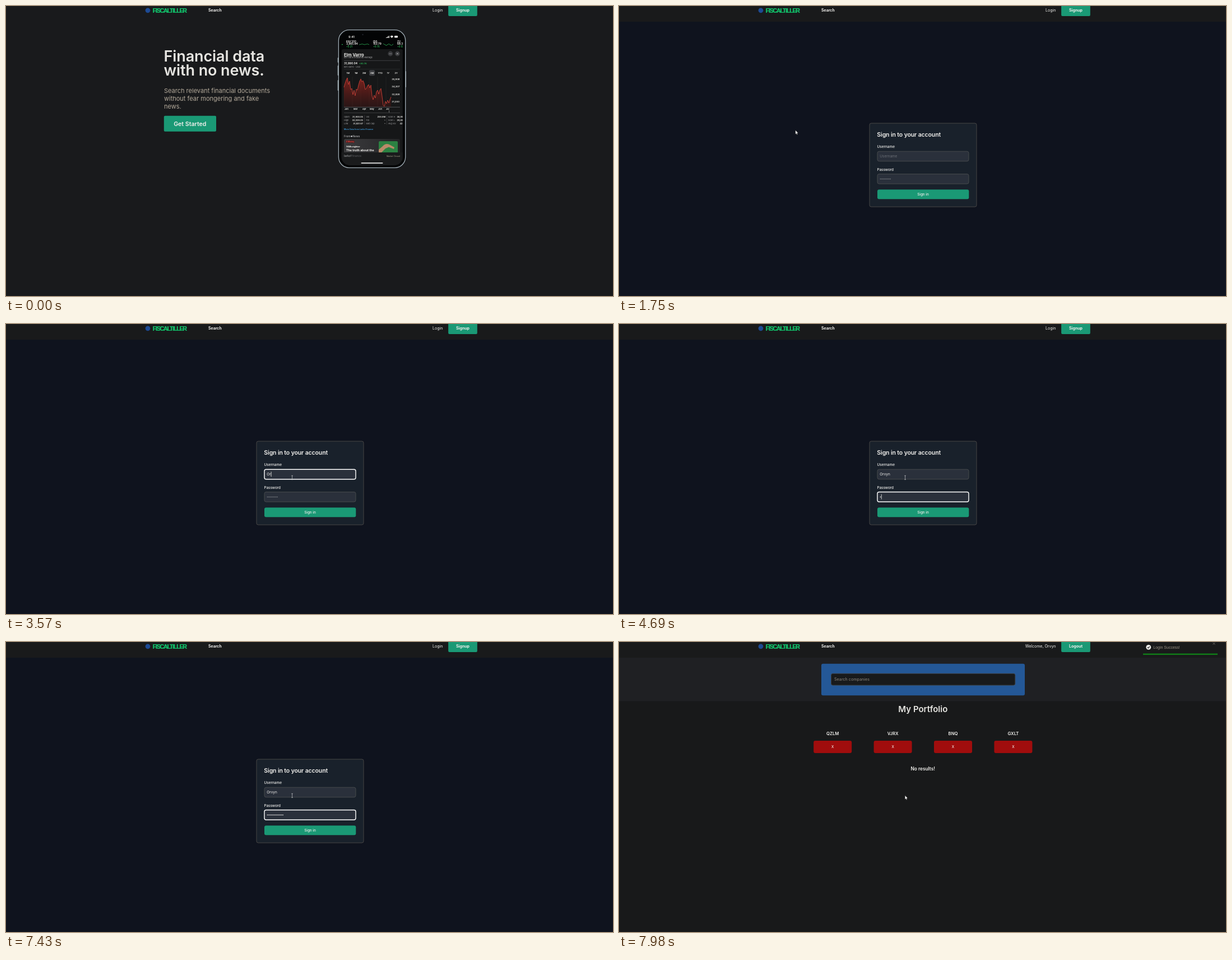
Animation, 1083 px wide and 517 px high, one loop 8000 ms. Source, as an HTML page with a canvas:

```html
<!DOCTYPE html>
<html lang="en">
<head>
<meta charset="utf-8">
<title>Finance site sign-in</title>
<style>
html, body { margin: 0; width: 100%; height: 100%; overflow: hidden; background: #191a1c; }
canvas { display: block; width: 1083px; height: 517px; }
</style>
</head>
<body>
<canvas id="stage"></canvas>
<script>
const W = 1083, H = 517, LOOP = 8000;
const canvas = document.getElementById('stage');
const ctx = canvas.getContext('2d');
const dpr = window.devicePixelRatio || 1;
canvas.width = W * dpr;
canvas.height = H * dpr;

const SANS = 'Inter, "Open Sans", sans-serif';
const ARIAL = '"Liberation Sans", Arial, sans-serif';
const GREEN = '#1a9975', WHITE = '#f1f0ed', NAV = '#191a1b';
const USER = 'Orvyn';
const KEYS = [3240, 3570, 3700, 3830, 3970];
const DOTS = [4690, 4890, 5160, 5300, 5560, 5770, 5900, 6100, 6300, 6370, 6440, 6900];
const PRICES = [145, 138, 132, 128, 140, 134, 149, 147, 158, 150, 160, 148, 150, 141, 134,
  130, 135, 133, 138, 149, 147, 142, 140, 146, 141, 160, 167, 159, 164, 153, 150, 157, 150,
  147, 161, 177, 179, 170, 174, 168, 173, 167, 162];

function text(s, x, y, size, color = WHITE, weight = 400, opt = {}) {
  ctx.font = `${weight} ${size}px ${opt.font || SANS}`;
  ctx.letterSpacing = (opt.track || 0) + 'px';
  ctx.textAlign = opt.align || 'left';
  ctx.fillStyle = color;
  ctx.fillText(s, x, y);
}

const center = (s, x, y, size, color, weight, opt) =>
  text(s, x, y, size, color, weight, { ...opt, align: 'center' });

function rect(x, y, w, h, color) {
  ctx.fillStyle = color;
  ctx.fillRect(x, y, w, h);
}

function box(x, y, w, h, r, fill, stroke, width = 1) {
  ctx.beginPath();
  ctx.roundRect(x, y, w, h, r);
  if (fill) { ctx.fillStyle = fill; ctx.fill(); }
  if (stroke) { ctx.strokeStyle = stroke; ctx.lineWidth = width; ctx.stroke(); }
}

function disc(x, y, r, color) {
  ctx.beginPath();
  ctx.arc(x, y, r, 0, Math.PI * 2);
  ctx.fillStyle = color;
  ctx.fill();
}

function line(points, color, width = 1) {
  ctx.beginPath();
  points.forEach(([x, y]) => ctx.lineTo(x, y));
  ctx.strokeStyle = color;
  ctx.lineWidth = width;
  ctx.stroke();
}

const count = (times, t) => times.filter(k => t >= k).length;
const ease = p => p * p * (3 - 2 * p);

function nav(loggedIn) {
  disc(253, 7.8, 4.4, '#1d4a94');
  // Two offset passes give the wordmark its heavy weight
  for (const x of [261.4, 261.9]) {
    text('FISCALTILLER', x, 11.8, 10.6, '#12b866', 700, { font: ARIAL, track: -1.2 });
  }
  text('Search', 361, 10, 6.9, WHITE, 700);
  if (loggedIn) text('Welcome, ' + USER, 779.5, 10, 7, WHITE, 400, { align: 'right' });
  else text('Login', 761, 10, 7);
  box(789.1, -6, 51.7, 24, 2, GREEN);
  center(loggedIn ? 'Logout' : 'Signup', 815, 10, 7, WHITE, 700);
}

function spark(x, y, amp, seed) {
  const pts = [];
  for (let i = 0; i <= 18; i++) {
    pts.push([x + i, y + amp * (Math.sin(i * 1.9 + seed) * 0.6 + Math.sin(i * 0.7 + seed))]);
  }
  line(pts, '#2aa851', 0.8);
}

function quote(name, price, change, x) {
  text(name, x, 64.6, 4.2, WHITE, 600);
  text(price, x, 69.4, 4.6, WHITE, 700);
  text(change, x, 74, 4.2, '#2fbf5b', 500);
}

function chart() {
  const pts = PRICES.map((y, i) => [603 + i * 2, y]);
  for (let x = 603; x <= 687; x += 15) line([[x, 126], [x, 180]], '#2b2a2b', 0.6);
  const fade = ctx.createLinearGradient(0, 126, 0, 180);
  fade.addColorStop(0, 'rgba(175,40,32,.7)');
  fade.addColorStop(1, 'rgba(80,20,18,.35)');
  ctx.beginPath();
  [[603, 180], ...pts, [687, 180]].forEach(([x, y]) => ctx.lineTo(x, y));
  ctx.fillStyle = fade;
  ctx.fill();
  line(pts, '#d8443a', 0.8);
  line([[603, 180.3], [703, 180.3]], '#66686a', 0.7);
  ['35,808', '34,307', '32,828', '31,300'].forEach((s, i) =>
    text(s, 688.3, 131.6 + i * 13.5, 4.1, WHITE, 600));
  [['Jan', 604], ['Mar', 620], ['Apr', 636], ['May', 649], ['Jun', 664], ['Jul', 678]]
    .forEach(([s, x]) => text(s, x, 184.7, 3.8, WHITE, 600));
  line([[603, 190.5], [703, 190.5]], '#4a4b4d', 0.7);
  line([[683.5, 186], [683.5, 190]], '#999', 0.7);
}

function table() {
  const rows = [
    ['Open', '31,900.05', 'Vol', '255.0M', '52W H', '36,95'],
    ['High', '32,029.05', 'P/E', '–', '52W L', '29,65'],
    ['Low', '31,821.67', 'Mkt Cap', '–', 'Avg Vol', '42']
  ];
  rows.forEach((r, i) => {
    const y = 198.5 + i * 6;
    text(r[0], 603, y, 3.8, '#a2a2a4');
    text(r[1], 637, y, 3.9, WHITE, 600, { align: 'right' });
    text(r[2], 642.5, y, 3.8, '#a2a2a4');
    text(r[3], 677, y, 3.9, WHITE, 600, { align: 'right' });
    text(r[4], 682, y, 3.8, '#a2a2a4');
    text(r[5], i < 2 ? 697.5 : 702.5, y, 3.9, WHITE, 600);
  });
  for (const x of [639.7, 679.5]) line([[x, 194.5], [x, 211.5]], '#4a4b4d', 0.6);
}

function newsCard() {
  const shade = ctx.createLinearGradient(603, 0, 703, 0);
  shade.addColorStop(0, '#3b3b3d');
  shade.addColorStop(1, '#242426');
  box(603, 237, 100, 24, [3, 3, 0, 0], shade);
  box(606, 239.5, 16, 4.5, 1, '#4a2224');
  text('# Money', 607, 243.2, 3.4, '#f0453f', 600);
  text('Millwrighter', 607, 252, 5, WHITE, 700,
    { font: '"Liberation Serif", "Noto Serif", serif', track: -0.25 });
  text('The truth about the', 607, 259, 5.3, WHITE, 700);
  box(665, 241, 34, 20, [2, 2, 0, 0], '#2c8142');
  ctx.beginPath();
  ctx.moveTo(672, 250);
  ctx.quadraticCurveTo(677, 244, 684, 247);
  ctx.lineTo(693, 252);
  ctx.lineTo(692, 255);
  ctx.lineTo(683, 251.5);
  ctx.lineTo(677, 254);
  ctx.lineTo(670, 261);
  ctx.lineTo(665, 261);
  ctx.lineTo(665, 256);
  ctx.fillStyle = '#b98a68';
  ctx.fill();
}

function statusBar() {
  text('9:41', 611, 57, 5.4, WHITE, 600);
  disc(636.5, 51, 1.2, '#20242c');
  for (let i = 0; i < 4; i++) rect(678 + i * 1.6, 56 - i, 1.1, i + 1, WHITE);
  ctx.beginPath();
  ctx.moveTo(688.3, 57);
  ctx.arc(688.3, 57, 4, -Math.PI * 0.75, -Math.PI * 0.25);
  ctx.fillStyle = WHITE;
  ctx.fill();
  box(693, 53, 6, 3.6, 1, WHITE);
}

function phone() {
  for (const [y, h] of [[92, 9], [106, 18], [132, 19]]) box(591.6, y, 2, h, 1, '#8d979d');
  box(712, 116, 2, 29, 1, '#8d979d');
  box(593.4, 42.7, 119.3, 245.6, 19, '#030405', '#a0adb5', 1.3);
  ctx.save();
  ctx.beginPath();
  ctx.roundRect(598.5, 46, 109.3, 238, 15);
  ctx.clip();
  statusBar();
  rect(599, 68, 1.8, 1.2, '#2fbf5b');
  quote('K&V 500', '3,965.84', '+0.21', 607);
  quote('QVL', '153.79', '+0.76', 655);
  quote('ZU', '68.39', '+0.19', 698);
  spark(630, 68.3, 0.5, 1);
  spark(673, 69, 1.2, 4);

  box(598.5, 77, 110, 215, [4, 4, 0, 0], '#161718');
  text('Elm Varro', 603, 89.6, 7.6, WHITE, 700);
  text('Elm Varro Industrial Average', 603, 93.4, 3.8, '#b5b5b7');
  disc(685.8, 85, 4.4, '#38393c');
  for (let i = -1; i < 2; i++) disc(685.8 + i * 1.6, 85, 0.5, '#c8c8c8');
  disc(698.4, 85, 4.4, '#38393c');
  line([[696.9, 83.5], [699.9, 86.5]], '#c8c8c8', 0.8);
  line([[699.9, 83.5], [696.9, 86.5]], '#c8c8c8', 0.8);
  line([[603, 97.3], [703, 97.3]], '#505154', 0.7);
  text('31,990.04', 603, 104.2, 4.8, WHITE, 700);
  text('+90.76', 629.7, 104.2, 4.1, '#2fbf5b', 500);
  text('Elm Varro · USD', 603, 110.2, 3.9, '#a2a2a4');
  line([[603, 112.6], [703, 112.6]], '#333436', 0.6);
  box(648, 114.3, 10, 10, 2, '#3d3e41');
  ['1W', '1M', '2M', '6M', 'YTD', '1Y', '2Y'].forEach((s, i) =>
    center(s, 610.4 + i * 14.3, 121, 4, WHITE, 600));
  chart();
  table();
  text('More Data from Larko Finance', 603, 220.7, 3.6, '#3a9ade', 600);
  text('From', 603, 234, 4.8, '#c9c9cb');
  disc(616.6, 232.3, 1.4, '#c9c9cb');
  text('News', 618.5, 234, 4.8, '#c9c9cb');
  newsCard();
  rect(598, 261, 111, 26, '#1a1b1c');
  text('larko!', 603, 269, 4.9, '#8a8b8d', 600);
  text('finance', 617, 269, 4.9, '#606164');
  text('Market Closed', 703, 269, 3.5, '#aaa48d', 400, { align: 'right' });
  box(633.5, 279.2, 39, 1.6, 0.8, '#fff');
  ctx.restore();
}

function home(hover) {
  rect(0, 0, W, H, '#191a1c');
  nav(false);
  const big = { track: -0.1 };
  text('Financial data', 281.5, 98.8, 27, '#e6e5e1', 600, big);
  text('with no news.', 281.5, 124.4, 27, '#e6e5e1', 600, big);
  ['Search relevant financial documents', 'without fear mongering and fake', 'news.']
    .forEach((s, i) => text(s, 282, 155 + i * 13.8, 11, '#b4aa9b'));
  box(281.8, 195.7, 93.2, 28, 2, hover ? '#19775d' : GREEN);
  center('Get Started', 328.3, 213.7, 10.6, hover ? '#b0b8b2' : WHITE, 600);
  phone();
}

function field(y, focused) {
  box(461, y, 163, 17.5, 3, '#2a303b', focused ? '#fff' : '#4b4e50', focused ? 1.4 : 0.9);
}

function bullets(n, color) {
  for (let i = 0; i < n; i++) disc(466.5 + i * 2.5, 308.3, 0.85, color);
}

const caret = (x, y) => rect(x, y - 4.5, 0.8, 9, WHITE);

function prompt() {
  ctx.save();
  ctx.shadowColor = 'rgba(0,0,0,.5)';
  ctx.shadowBlur = 4;
  box(461, 277.5, 95.5, 35, 1, '#1d1e1f', '#303132', 0.8);
  ctx.restore();
  const face = { font: '"Open Sans", sans-serif' };
  rect(464.5, 280.5, 5.5, 5.5, '#c9c9c6');
  text('Nimvor Passwords', 474, 285.8, 5.5, '#e4e3e0', 600, { ...face, track: -0.1 });
  line([[461, 289.8], [556, 289.8]], '#484949', 0.7);
  text('Manage Passwords...', 466.2, 299.2, 5.6, '#efeeeb', 600, face);
  text('Look up and create passwords.', 466.2, 307, 5, '#a9a49c', 400, face);
}

function signIn(t) {
  rect(0, 0, W, H, '#0f131e');
  rect(0, 0, W, 28, NAV);
  nav(false);
  box(447, 209, 191, 149, 3, '#19212b', '#4d4b48', 0.9);
  text('Sign in to your account', 460.3, 233.4, 10.5, WHITE, 600, { track: -0.12 });
  text('Username', 460.5, 253.2, 6.4, WHITE, 500);
  text('Password', 460.5, 293.6, 6.3, WHITE, 500);

  const onName = t >= 2700 && t < 4160, onPass = t >= 4160;
  const typed = count(KEYS, t), dots = count(DOTS, t);
  field(259.2, onName);
  field(299.5, onPass);
  const name = USER.slice(0, typed);
  text(name || 'Username', 465.3, 270, 6.4, name ? WHITE : '#6c7077');
  if (onName) caret(465.4 + (name ? ctx.measureText(name).width : 0), 267.8);
  bullets(dots || 8, dots ? WHITE : '#7b7f84');
  if (onPass && t < 7430) caret(465.3 + dots * 2.5, 308);

  box(461, 327.3, 163.3, 17, 3, GREEN);
  center('Sign in', 542.5, 338.2, 6.3, WHITE, 500);
  if (t >= 2700 && t < 3240) prompt();
}

function toast(t) {
  ctx.save();
  ctx.translate(t < 7980 ? 85 : 0, 0);
  rect(935, 0, 133, 23, NAV);
  rect(935, 20.5, 133, 2.5, '#107a18');
  disc(944.8, 9.3, 4.4, '#f0efec');
  line([[942.8, 9.4], [944.2, 10.9], [947, 7.8]], NAV, 1.1);
  text('Login Success!', 953.3, 11.7, 7, '#9b9487', 400, { font: ARIAL });
  line([[1059.5, 0.8], [1063.5, 4.8]], '#77736c', 0.8);
  line([[1063.5, 0.8], [1059.5, 4.8]], '#77736c', 0.8);
  ctx.restore();
}

function portfolio(t) {
  rect(0, 0, W, H, '#18191a');
  rect(0, 0, W, 28, NAV);
  rect(0, 28, W, 77.5, '#1f2023');
  nav(true);
  box(361, 38.8, 363, 56.4, 3, '#245897');
  box(378.5, 56.3, 328.3, 20.8, 3, '#181a1b', '#3c4043', 1);
  text('Search companies', 384, 69.2, 7.2, '#8c867d');
  center('My Portfolio', 542.3, 124.6, 15, '#e6e5e1', 600);
  ['QZLM', 'VJRX', 'BNQ', 'GXLT'].forEach((s, i) => {
    const x = 381.2 + i * 107.4;
    center(s, x, 165.8, 7.7, WHITE, 600);
    box(x - 34, 176, 68, 22, 3, '#a00d0d');
    center('X', x, 189, 6.2, WHITE, 500);
  });
  center('No results!', 542.2, 229.2, 8.3, WHITE, 600);
  if (t >= 7910) toast(t);
}

function arrow(x, y) {
  ctx.beginPath();
  [[0, 0], [0, 7.2], [1.6, 5.7], [2.7, 8], [3.9, 7.4], [2.9, 5.2], [5, 5]]
    .forEach(([a, b]) => ctx.lineTo(x + a, y + b));
  ctx.closePath();
  ctx.fillStyle = '#fff';
  ctx.strokeStyle = '#111';
  ctx.lineWidth = 0.5;
  ctx.fill();
  ctx.stroke();
}

function hand(x, y) {
  box(x - 0.7, y, 1.5, 6, 0.7, '#fff');
  box(x - 0.9, y + 3, 4.8, 5, 1.4, '#fff');
  line([[x - 2, y + 4.5], [x, y + 7]], '#fff', 1.2);
}

function beam(x, y) {
  line([[x, y - 3.5], [x, y + 3.5]], '#c4c6c9', 0.7);
  for (const d of [-3.5, 3.5]) line([[x - 1.4, y + d], [x + 1.4, y + d]], '#c4c6c9', 0.7);
}

const ring = (x, y) => disc(x, y, 5.4, 'rgba(190,190,25,.72)');

// Pointer position advances in 70 ms ticks
const tick = (t, start, steps) => Math.min(1, (Math.floor((t - start) / 70) + 1) / steps);

function pointer(t) {
  if (t < 390) return;
  if (t < 1750) {
    const p = 1 - (1 - tick(t, 320, 11)) ** 1.6, q = 1 - p;
    const x = q * q * 1061 + 2 * p * q * 520 + p * p * 314.5;
    const y = q * q * 502 + 2 * p * q * 80 + p * p * 222;
    if (t >= 1680) ring(314.3, 221.3);
    if (x < 375 && y > 196) hand(x, y); else arrow(x, y);
  } else if (t < 7770) {
    const p = t < 1950 ? 0 : ease(tick(t, 1950, 6));
    const x = 314.8 + 195.8 * p, y = 221.5 + 52.3 * p;
    if (x > 461 && y > 259) beam(x, y); else arrow(x, y);
    if (t >= 2700 && t < 2770) ring(509.6, 273.2);
  } else arrow(510.2, 273.6);
}

function frame(now) {
  const t = now % LOOP;
  ctx.setTransform(dpr, 0, 0, dpr, 0, 0);
  if (t < 1750) home(t >= 950);
  else if (t < 7700) signIn(t);
  else portfolio(t);
  pointer(t);
}

const begin = performance.now();
function loop() {
  frame(performance.now() - begin);
  requestAnimationFrame(loop);
}
loop();
</script>
</body>
</html>
```
